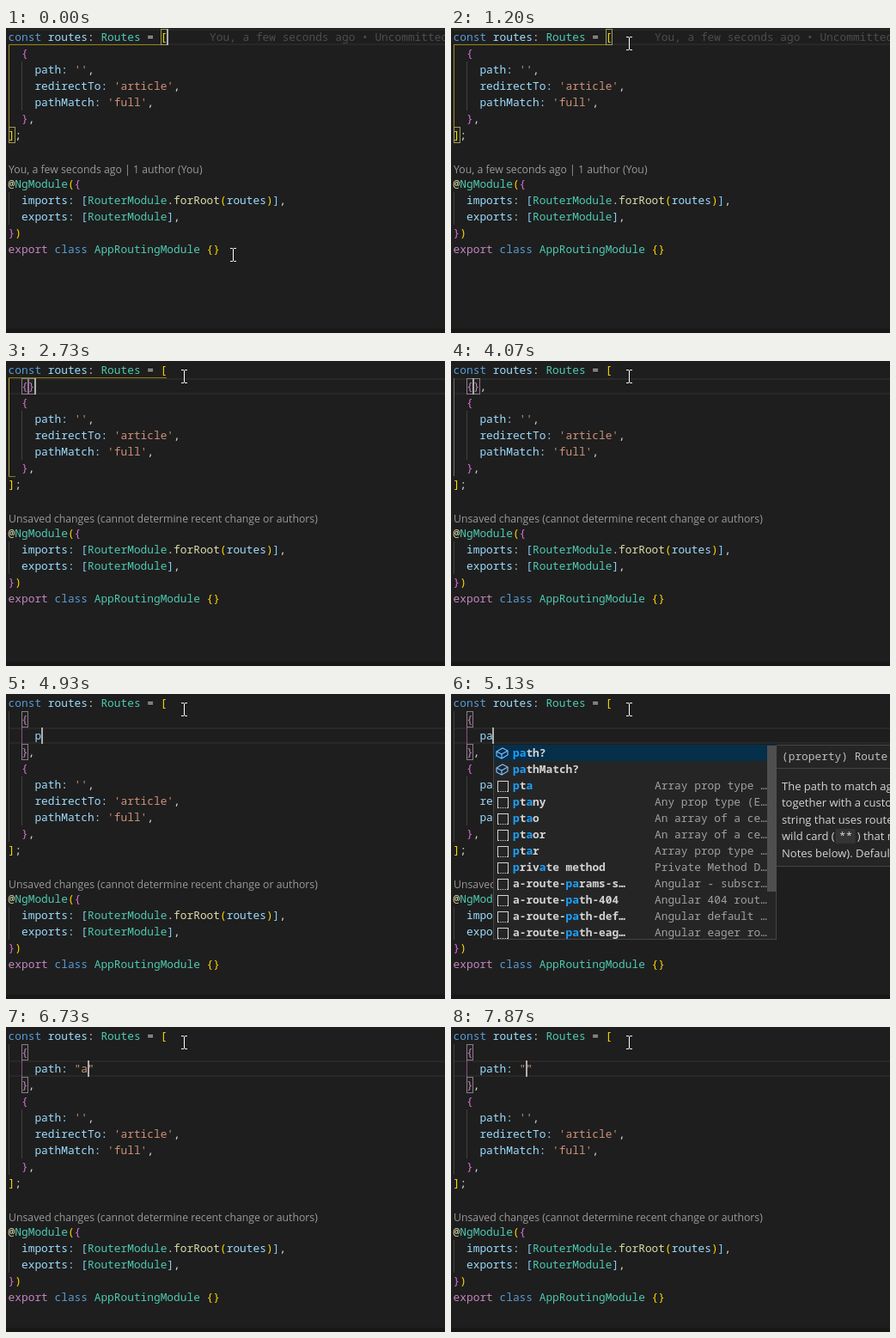
Animation of 511x355 px, one loop 8000 ms. Source, as an HTML page with a canvas:

```html
<!DOCTYPE html>
<html lang="en">
<head>
<meta charset="utf-8">
<title>Editor</title>
<style>
  html, body { margin: 0; width: 100%; height: 100%; overflow: hidden; background: #1e1e1e; }
  canvas { display: block; }
</style>
</head>
<body>
<canvas id="stage" width="511" height="355"></canvas>
<script>
const ctx = document.getElementById('stage').getContext('2d');
const LOOP = 8000, W = 511, H = 355;
const X0 = 2.6, CW = 7.7, LH = 19;
const mono = weight => `${weight} 12.83px "Noto Sans Mono", "DejaVu Sans Mono", monospace`;
const sans = (size, weight = 400) => `${weight} ${size}px "Open Sans", "Noto Sans", sans-serif`;
const CODE = mono(500), LABEL = mono(600);
const BRACKETS = ['#ffd700', '#da70d6', '#87cefa'];
const GOLD_LINE = 'rgba(255,215,0,.5)', PINK_LINE = 'rgba(218,112,214,.6)';
const GUIDE = '#404040', ACTIVE_GUIDE = '#707070', PLAIN = '#d4d4d4', NAME = '#9cdcfe';

const colX = col => X0 + CW * col;
const rowY = row => 1 + LH * row;

// Value of the last [time, value] step that has started.
const at = (steps, t) => steps.reduce((v, s) => t >= s[0] ? s[1] : v, steps[0][1]);

const TYPED = [[4330, ''], [4800, 'p'], [5000, 'pa'], [5330, 'pat'], [5670, 'path'],
  [5930, 'path:'], [6000, 'path: '], [6200, 'path: ""'], [6600, 'path: "a"'],
  [7200, 'path: ""'], [7530, 'path: "a"'], [7870, 'path: ""']];
const INSERTED = [[0, null], [1600, '  '], [1730, '  {}'], [3670, '  {},']];
const CARET_COL = [[0, 24], [1600, 2], [1730, 3], [2730, 4], [3670, 5], [3730, 4], [4070, 3]];
const CARET_ON = [[0, 1], [130, 0], [670, 1], [1200, 0], [1600, 1], [2470, 0],
  [2730, 1], [3200, 0], [3670, 1]];
const SCOPE_LINE = [[0, 1], [2330, 0], [2730, 1], [4070, 0]];
const SCOPE_BOX = [[0, 1], [2000, 0], [3200, 1], [3730, 0]];

const ENTRY = ['  {', "    path: '',", "    redirectTo: 'article',", "    pathMatch: 'full',", '  },', '];'];
const MODULE = ['@NgModule({', '  imports: [RouterModule.forRoot(routes)],',
  '  exports: [RouterModule],', '})', 'export class AppRoutingModule {}'];

const ITEMS = [['path?'], ['pathMatch?'], ['pta', 'Array prop type …'], ['ptany', 'Any prop type (E…'],
  ['ptao', 'An array of a ce…'], ['ptaor', 'An array of a ce…'], ['ptar', 'Array prop type …'],
  ['private method', 'Private Method D…'], ['a-route-params-s…', 'Angular - subscr…'],
  ['a-route-path-404', 'Angular 404 rout…'], ['a-route-path-def…', 'Angular default …'],
  ['a-route-path-eag…', 'Angular eager ro…']];

function rect(x, y, w, h, color) {
  ctx.fillStyle = color;
  ctx.fillRect(x, y, w, h);
}

function frame(x, y, w, h, color) {
  ctx.strokeStyle = color;
  ctx.lineWidth = 1;
  ctx.strokeRect(x + .5, y + .5, w - 1, h - 1);
}

function text(str, x, y, color, font = CODE) {
  ctx.font = font;
  ctx.fillStyle = color;
  ctx.fillText(str, x, y);
}

function tokenColor(tok, indented) {
  if (/^['"]/.test(tok)) return '#ce9178';
  if (tok === 'const' || tok === 'class') return '#569cd6';
  if (tok === 'export') return '#c586c0';
  if (tok === 'forRoot' || tok === '@') return '#dcdcaa';
  if (/^[A-Z]/.test(tok)) return '#4ec9b0';
  if (/^\w/.test(tok) || (tok === ':' && indented)) return NAME;
  return PLAIN;
}

function drawCode(lines, row, depth = 0) {
  for (const line of lines) {
    for (const m of line.matchAll(/'[^']*'|"[^"]*"|\w+|\S/g)) {
      const tok = m[0];
      let color;
      if (/^[\[{(]$/.test(tok)) color = BRACKETS[depth++ % 3];
      else if (/^[\]})]$/.test(tok)) color = BRACKETS[--depth % 3];
      else color = tokenColor(tok, line[0] === ' ');
      text(tok, colX(m.index), rowY(row) + 14, color);
    }
    row++;
  }
}

function bracketBox(row, col, color) {
  const x = Math.round(colX(col)), y = rowY(row);
  rect(x, y, 8, LH, 'rgba(0,100,0,.1)');
  frame(x, y, 8, LH, color);
}

function guide(col, from, to, color = GUIDE) {
  rect(Math.round(colX(col)), rowY(from), 1, LH * (to - from), color);
}

function squiggle(x, end, row) {
  const y = rowY(row) + 16;
  ctx.beginPath();
  ctx.moveTo(x, y + 2);
  for (let i = 1; x + i * 2 <= end; i++) ctx.lineTo(x + i * 2, y + (i % 2 ? 0 : 2));
  ctx.strokeStyle = '#f14c4c';
  ctx.lineWidth = 1;
  ctx.stroke();
}

function cube(x, y) {
  ctx.strokeStyle = '#75beff';
  ctx.lineWidth = 1.2;
  ctx.beginPath();
  ctx.moveTo(x + 1, y + 5);
  ctx.lineTo(x + 8, y + 1);
  ctx.lineTo(x + 14, y + 4);
  ctx.lineTo(x + 14, y + 9);
  ctx.lineTo(x + 7, y + 13);
  ctx.lineTo(x + 1, y + 10);
  ctx.closePath();
  ctx.lineTo(x + 7, y + 8);
  ctx.lineTo(x + 14, y + 4);
  ctx.moveTo(x + 7, y + 8);
  ctx.lineTo(x + 7, y + 13);
  ctx.stroke();
}

function snippet(x, y) {
  frame(x + 2, y + 1, 13, 13, '#d4d4d4');
  for (let i = 4; i < 14; i += 2) rect(x + i, y + 13, 1, 1, '#252526');
}

// Colours the letters of the typed word, taken in order.
function label(str, word, x, y) {
  let from = str.includes(word) ? str.indexOf(word) : 0, next = 0;
  [...str].forEach((ch, i) => {
    const hit = i >= from && ch === word[next];
    if (hit) next++;
    text(ch, x + i * CW, y, hit ? '#18a3ff' : PLAIN, LABEL);
  });
}

function docs(x) {
  const tx = x + 6, body = sans(13, 500), ink = '#d4d4d4';
  rect(x, 59, W, 142, '#252526');
  rect(x, 59, W, 1, '#454545');
  rect(x, 200, W, 1, '#454545');
  text('(property) Route.path', tx, 77, '#bdbdbd');
  rect(x, 86, W, 1, '#454545');
  const rows = ['The path to match against,', 'together with a custom', 'string that uses router',
    'wild card (', 'Notes below). Default is'];
  const base = i => Math.round(112 + 19.4 * i);
  rows.forEach((s, i) => text(s, tx, base(i), ink, body));
  ctx.font = body;
  const after = tx + ctx.measureText(rows[3]).width;
  rect(after + 1, base(3) - 13, 23, 17, '#343434');
  text('**', after + 5, base(3), PLAIN);
  text(') that matches', after + 26, base(3), ink, body);
}

function popup(x, word, withDocs) {
  rect(x, 59, 330, 227, '#252526');
  frame(x, 59, 330, 227, '#454545');
  rect(x + 1, 59, 329, LH, '#062f4a');
  ITEMS.forEach(([name, detail], i) => {
    const y = 59 + LH * i;
    (detail ? snippet : cube)(x + 3, y + 3);
    label(name, word, x + 23, y + 14);
    if (detail) text(detail, x + 188, y + 14, '#a0a0a0');
  });
  rect(x + 319, 60, 11, 170, '#4f4f4f');
  if (withDocs) docs(x + 330);
}

function pointer(t) {
  const p = Math.min(Math.floor((t + 4) / 66.667), 11) / 11;
  const u = p * p * (3 - 2 * p), v = 1 - u;
  const x = Math.round(v * v * 264 + 2 * u * v * 70 + u * u * 207);
  const y = Math.round(v * v * 256 + 2 * u * v * 90 + u * u * 10);
  rect(x, y + 1, 1, 14, '#fff');
  for (const end of [y, y + 15]) {
    rect(x - 3, end, 3, 1, '#fff');
    rect(x + 1, end, 3, 1, '#fff');
  }
}

function draw(t) {
  const split = t >= 4330;
  const typed = at(TYPED, t), inserted = at(INSERTED, t);
  const added = split ? ['  {', '    ' + typed, '  },'] : inserted === null ? [] : [inserted];
  const n = added.length, close = n + 6, mod = n + 9;
  const caretRow = split ? 2 : n;
  const caretCol = split ? 4 + typed.length - (typed.endsWith('"') ? 1 : 0) : at(CARET_COL, t);

  rect(0, 0, W, H, '#1e1e1e');
  rect(0, 350, W, 5, '#191718');
  rect(3, rowY(caretRow), W, 2, '#282828');
  rect(3, rowY(caretRow) + LH - 2, W, 2, '#282828');

  guide(0, 1, close, t >= 1600 && t < 4530 ? ACTIVE_GUIDE : GUIDE);
  guide(2, n + 2, n + 5);
  guide(0, mod + 1, mod + 3);
  if (split) guide(2, 2, 3, t >= 4530 ? PINK_LINE : GUIDE);

  if (at(SCOPE_LINE, t)) {
    rect(3, 19, 184, 1, GOLD_LINE);
    guide(0, 1, close, GOLD_LINE);
    rect(3, rowY(close), 8, 1, GOLD_LINE);
  }
  if (at(SCOPE_BOX, t)) {
    bracketBox(0, 23, '#a3965a');
    bracketBox(close, 0, '#a3965a');
  }
  if (t >= 1800) {
    bracketBox(1, 2, '#8e7b8d');
    if (split) bracketBox(3, 2, '#8e7b8d');
    else bracketBox(1, 3, '#8e7b8d');
  }

  drawCode(['const routes: Routes = [', ...added, ...ENTRY], 0);
  drawCode(MODULE, mod);
  const lens = t < 2200 ? 'You, a few seconds ago | 1 author (You)'
    : 'Unsaved changes (cannot determine recent change or authors)';
  text(lens, 3, rowY(mod - 1) + 16, '#999999', sans(12.28));
  if (t < 1600) text('You, a few seconds ago • Uncommitted changes', 237, 15, '#4d4d4d');

  if (t >= 3530 && t < 3670) squiggle(18, 26, 2);
  if (t >= 5330 && t < 6670) squiggle(34, 49, 2);
  if (at(CARET_ON, t)) rect(Math.floor(colX(caretCol)), rowY(caretRow), 2, LH, '#aeafad');

  if (t >= 5070 && t < 5330) popup(49, typed, t >= 5130);
  if (t >= 5400 && t < 5670) popup(57, typed, true);
  pointer(t);
}

const start = performance.now();
function tick() {
  draw((performance.now() - start) % LOOP);
  requestAnimationFrame(tick);
}
tick();
</script>
</body>
</html>
```
